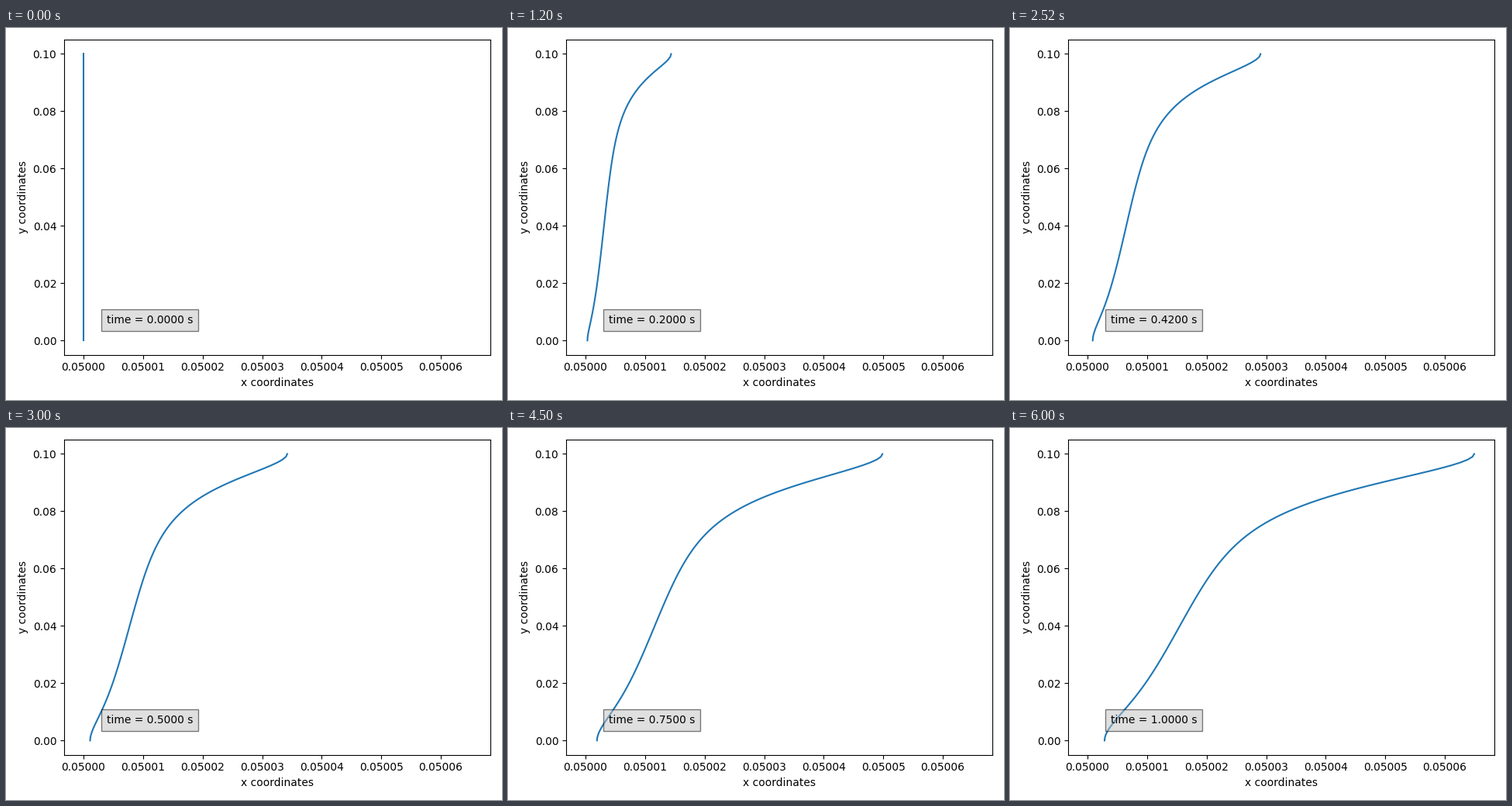
A matplotlib script that plays this animation: 640x480 px, repeating every 6060 ms.

```python
import numpy as np
import matplotlib.pyplot as plt
from matplotlib.animation import FuncAnimation

FRAMES, STEP = 101, 0.01
H = 0.1              # length of the line
X0 = 0.05            # rest position
UNIT = 1e-5          # scale of the drift
DIFFUSION = 3.0e-5
DECAY = 0.0095       # depth of the layers at both ends
MODES = 160


def layer(depth):
    """Profile that is 1 at a wall and fades away from it."""
    z = depth / DECAY
    return 1.3 * np.exp(-z) - 0.3 * np.exp(-2 * z)


def drift(y):
    """Speed at which each height is pushed to the right."""
    return 0.586 + 2.407 * y / H + 4.867 * layer(H - y) - 0.54 * layer(y)


# Diffusion with insulated ends, solved as a cosine series.
n = np.arange(1, MODES)
fine = (np.arange(2000) + 0.5) * H / 2000
push = drift(fine)
mean = push.mean()
coef = 2 * (push * np.cos(np.outer(n, fine) * np.pi / H)).mean(axis=1)
rate = DIFFUSION * (n * np.pi / H) ** 2

y = np.linspace(0, H, 101)
waves = np.cos(np.outer(y, n) * np.pi / H)


def position(t):
    return X0 + UNIT * (mean * t + waves @ (coef * (1 - np.exp(-rate * t)) / rate))


fig, ax = plt.subplots(figsize=(6.4, 4.8), dpi=100)
line, = ax.plot(position(0), y)
ax.set_xlim(X0 - 0.3254 * UNIT, X0 + 6.8334 * UNIT)
ax.set_ylim(-0.05 * H, 1.05 * H)
ax.ticklabel_format(useOffset=False)
ax.set_xlabel("x coordinates")
ax.set_ylabel("y coordinates")
label = ax.text(0.1, 0.1, "time = 0.0000 s", transform=ax.transAxes,
                bbox=dict(facecolor="silver", alpha=0.5, pad=5))
fig.tight_layout()


def update(i):
    t = i * STEP
    line.set_xdata(position(t))
    label.set_text(f"time = {t:.4f} s")
    return line, label


anim = FuncAnimation(fig, update, frames=FRAMES, interval=60,
                     repeat=True, repeat_delay=0)
plt.show()
```
